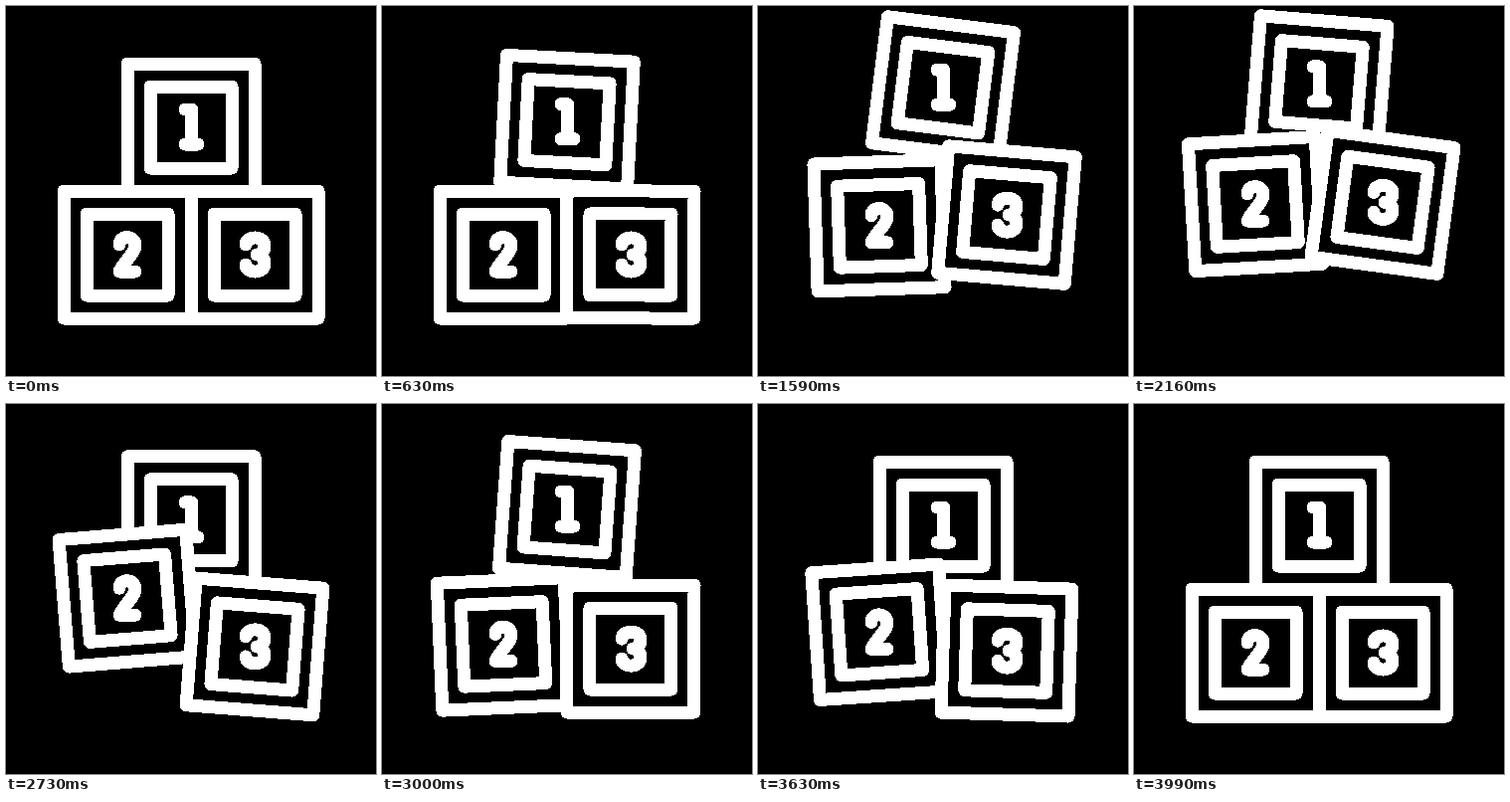
These frames come from a looping animation (372x372 px, 4500 ms). An HTML page:

```html
<!DOCTYPE html>
<html lang="en">
<head>
<meta charset="utf-8">
<title>Counting blocks</title>
<style>
  html, body { margin: 0; width: 100%; height: 100%; overflow: hidden; background: #000; }
  svg { display: block; width: 100%; height: 100%; shape-rendering: crispEdges; }
  path, rect { stroke: #fff; stroke-width: 13; stroke-linecap: round; stroke-linejoin: round; fill: none; }
  .box { fill: #000; }
</style>
</head>
<body>
<svg viewBox="0 0 372 372"></svg>
<script>
const LOOP = 4500, STEP = 30, END = 3990;

// Each block floats up from `start`, leaning to `lean` degrees along an arc of
// `sweep` radians, falls at `drop`, then hops once by `hop` pixels and `hopLean` degrees.
const blocks = [
  {
    x: 186, y: 122, digit: 'M-6 -18H0.5V17M-6 17H7',
    start: 300, drop: 2160, height: 43.3, lean: 4.7, sweep: 2.43, hop: 16, hopLean: 4.2
  },
  {
    x: 122, y: 250, digit: 'M-8 -10C-8 -20 8 -20 8 -9C8 -2 -4 8 -8 17H8',
    start: 850, drop: 2730, height: 55, lean: -4.6, sweep: 0.5, hop: 21.5, hopLean: -4
  },
  {
    x: 250, y: 250, digit: 'M-9 -10C-8 -20 10 -19 10 -9C10 -3 6 0 2 0C6 0 10 3 10 9C10 19 -8 20 -9 10',
    start: 625, drop: 2445, height: 54, lean: 9, sweep: 0.5, hop: 14.5, hopLean: 4.6
  }
];

const progress = (t, from, to) => Math.min(1, Math.max(0, (t - from) / (to - from)));
const ease = (t, from, to) => {
  const u = progress(t, from, to);
  return u * u * (3 - 2 * u);
};

function lift(b, t) {
  const rise = 1 - Math.exp(-((Math.max(0, t - b.start) / 842) ** 2.17));
  const fall = ease(t, b.drop, b.drop + 360);
  const hop = Math.sin(Math.PI * progress(t, b.drop + 400, b.drop + 1290)) ** 2;
  return b.height * rise * (1 - fall) + b.hop * hop;
}

function tilt(b, t) {
  const swing = Math.sin(b.sweep * progress(t, b.start, b.drop)) / Math.sin(b.sweep);
  const level = ease(t, b.drop, b.drop + 570);
  const hop = ease(t, b.drop + 570, b.drop + 855)
    - ease(t, b.drop + 855, Math.min(b.drop + 1425, END));
  return b.lean * swing * (1 - level) + b.hopLean * hop;
}

const square = (size, name) =>
  `<rect class="${name}" x="${-size / 2}" y="${-size / 2}" width="${size}" height="${size}"/>`;

const svg = document.querySelector('svg');
svg.innerHTML = blocks.map(b =>
  `<g><g>${square(128, 'box')}${square(82, 'frame')}</g><path d="${b.digit}"/></g>`).join('');
blocks.forEach((b, i) => {
  b.group = svg.children[i];
  b.frame = b.group.firstChild;
});

const origin = performance.now();

function draw() {
  const elapsed = (performance.now() - origin) % LOOP;
  const t = Math.min(END, Math.floor(elapsed / STEP) * STEP);
  for (const b of blocks) {
    const y = t < END ? b.y - lift(b, t) : b.y;
    b.group.setAttribute('transform', `translate(${b.x} ${y})`);
    b.frame.setAttribute('transform', `rotate(${tilt(b, t)})`);
  }
  requestAnimationFrame(draw);
}
draw();
</script>
</body>
</html>
```
